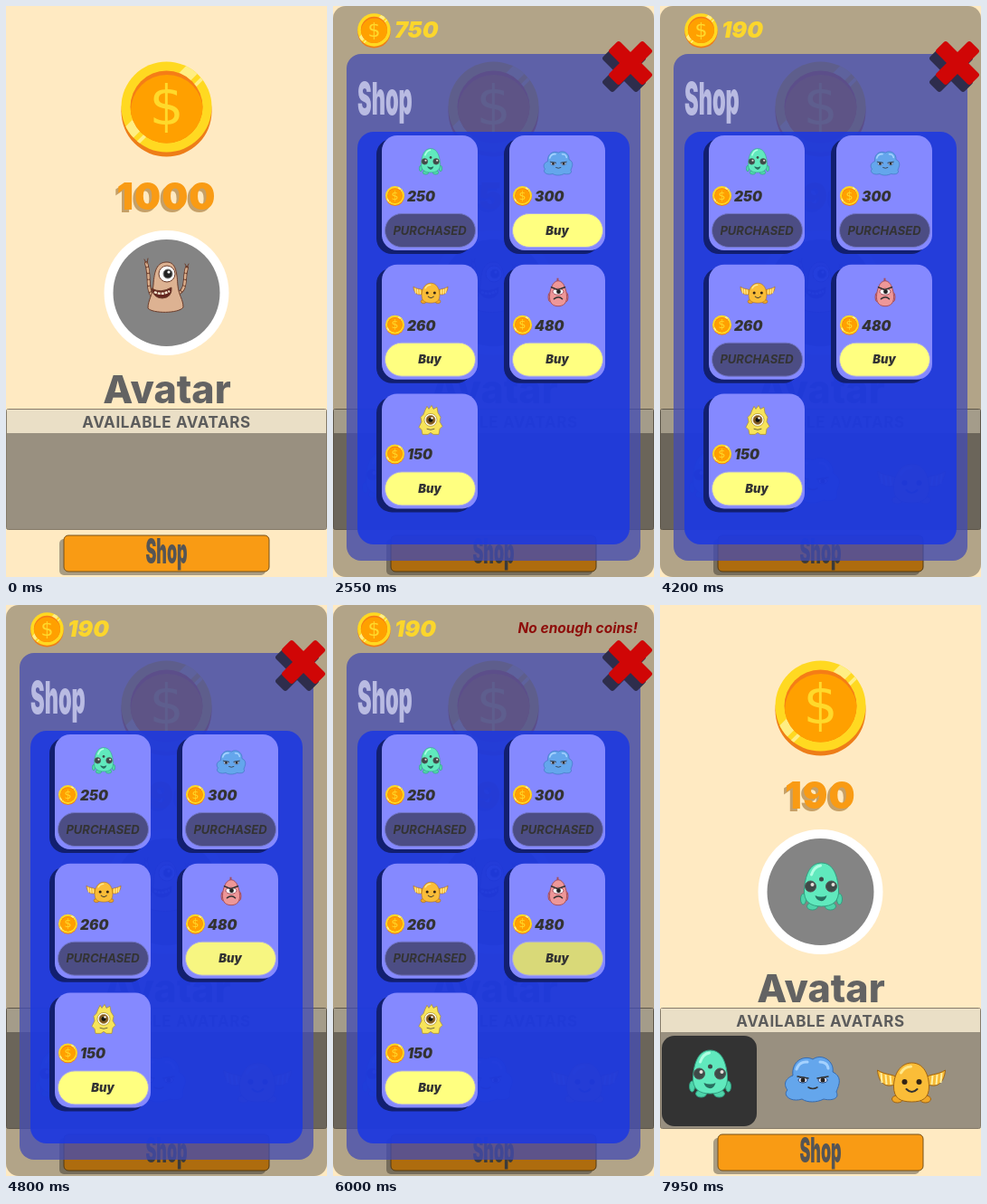
Recreate the animation shown at these times as an HTML page. Size 355 px wide and 631 px high, loop 8000 ms.

```html
<!DOCTYPE html>
<html lang="en">
<head>
<meta charset="utf-8">
<title>Avatar shop</title>
<style>
  html, body { margin: 0; width: 100%; height: 100%; overflow: hidden; background: #ffeac2; }
  svg { display: block; }
  text { font-family: Inter, "Open Sans", sans-serif; font-weight: 900; }
  .mid { text-anchor: middle; }
  .it { font-style: italic; }
  .dollar { font: 400 60px "DejaVu Sans", sans-serif; fill: #ffd92b; }
  .total { font-size: 41px; letter-spacing: 1px; fill: #f99b14; filter: drop-shadow(-3px 3px 0 #c5a068); }
  .ink { fill: none; stroke: #333; stroke-linecap: round; }
</style>
</head>
<body>
<svg id="stage" width="355" height="631" viewBox="0 0 355 631">
  <defs>
    <clipPath id="disc"><circle cx="50.5" cy="50.5" r="50"/></clipPath>
    <clipPath id="hole"><circle cx="50.5" cy="50.5" r="40"/></clipPath>

    <g id="coin">
      <circle cx="50.5" cy="55.5" r="50" fill="#ee7d18"/>
      <circle cx="50.5" cy="50.5" r="50" fill="#ffd921"/>
      <g clip-path="url(#disc)" stroke="#ffee83">
        <path d="M100-12L-12 100" stroke-width="15"/>
        <path d="M116-7L-7 116" stroke-width="4"/>
      </g>
      <circle cx="50.5" cy="50.5" r="40" fill="#f57d16"/>
      <circle cx="51" cy="55" r="40" fill="#ffa000" clip-path="url(#hole)"/>
      <text class="dollar mid" x="50.5" y="70">$</text>
    </g>

    <g id="cyclops" stroke="#6b3d2c">
      <g fill="none" stroke-linecap="round">
        <path d="M9 42C2 32 7 20 2 5M36 39C48 35 43 22 47 10" stroke-width="4"/>
        <path d="M9 42C2 32 7 20 2 5M36 39C48 35 43 22 47 10" stroke="#dcb08d" stroke-width="2.4" stroke-dasharray="4 3"/>
        <path d="M2 5L0 1M3 5L4 0M47 10L45 6M47 10L49 6"/>
      </g>
      <path d="M4 55C4 46 9 41 10 29C11 13 14 4 25 4C36 4 36 19 37 30C38 41 43 45 43 54C38 61 9 61 4 55Z" fill="#ddb292"/>
      <circle cx="25" cy="17" r="9" fill="#fff"/>
      <circle cx="26" cy="17" r="5" fill="#222" stroke="#777"/>
      <circle cx="27" cy="15" r="1.6" fill="#fff" stroke="none"/>
      <path d="M8 33Q18 39 30 32Q31 43 20 44Q10 44 8 33Z" fill="#63261f"/>
      <path d="M11 37Q19 41 28 36" stroke="#f7ead2" stroke-width="2.5" stroke-dasharray="3 1" fill="none"/>
    </g>

    <g id="mint" stroke="#319e80">
      <g fill="#4ed4aa">
        <ellipse cx="14" cy="49" rx="6" ry="4"/><ellipse cx="34" cy="49" rx="6" ry="4"/>
        <ellipse cx="4" cy="41" rx="3" ry="6"/><ellipse cx="44" cy="41" rx="3" ry="6"/>
      </g>
      <path d="M24 1C38 1 42 17 43 30C44 44 36 49 24 49C12 49 4 44 5 30C6 17 10 1 24 1Z" fill="#60e9bd"/>
      <path d="M13 14Q16 5 23 4" fill="none" stroke="#b0ffe3" stroke-width="3" stroke-linecap="round"/>
      <g stroke="#555" fill="#3e4a48">
        <circle cx="12" cy="27" r="6"/><circle cx="35" cy="27" r="6"/><circle cx="24" cy="19" r="2.5" stroke="none"/>
      </g>
      <g fill="#e6ddd8" stroke="none"><circle cx="14" cy="25" r="2"/><circle cx="37" cy="25" r="2"/></g>
      <path d="M17 37Q24 40 30 37Q28 44 23 43Q18 42 17 37Z" fill="#286f60" stroke="none"/>
    </g>

    <g id="cloud" stroke="#346bb2">
      <path d="M10 22C8 6 22-1 32 4C42-3 56 6 54 18C66 24 60 34 58 40C62 48 52 50 44 48C36 52 26 52 20 48C8 52-2 44 4 38C-2 30 4 24 10 22Z" fill="#64a6ec"/>
      <path d="M14 15Q17 6 26 7M40 7Q48 7 49 14" fill="none" stroke="#a5d2ff" stroke-width="3" stroke-linecap="round"/>
      <g fill="#eef" stroke="#234a84"><ellipse cx="21" cy="27" rx="5" ry="3"/><ellipse cx="43" cy="27" rx="5" ry="3"/></g>
      <g fill="#222" stroke="none"><circle cx="21" cy="27" r="2.5"/><circle cx="43" cy="27" r="2.5"/></g>
      <path class="ink" d="M15 23L27 25M37 25L49 23M27 35Q32 38 37 35" stroke-width="1.5"/>
    </g>

    <g id="horns" stroke="#a06412">
      <g id="horn">
        <path d="M20 25C9 29 2 22 1 9C9 14 15 13 21 16Z" fill="#f8bb35"/>
        <path d="M5 12L6 23M10 14L11 25M15 15L16 25" stroke="#fff0a5" stroke-width="2"/>
      </g>
      <use href="#horn" transform="matrix(-1 0 0 1 77 0)"/>
      <g fill="#efa728"><ellipse cx="23" cy="41" rx="6" ry="4"/><ellipse cx="54" cy="41" rx="6" ry="4"/></g>
      <path d="M39 1C52 1 58 14 58 27C58 40 51 44 39 44C26 44 19 40 19 27C19 14 26 1 39 1Z" fill="#fabd38"/>
      <path d="M27 12Q31 5 38 5" fill="none" stroke="#ffe88b" stroke-width="3" stroke-linecap="round"/>
      <g fill="#332414" stroke="none"><circle cx="31" cy="22" r="3"/><circle cx="47" cy="22" r="3"/></g>
      <path class="ink" d="M33 30Q39 36 45 30" stroke-width="2"/>
    </g>

    <g id="pink" stroke="#a44f5d">
      <path d="M11 5V1" stroke-width="2"/>
      <ellipse cx="2.5" cy="22" rx="2" ry="5" fill="#dc7a84"/><ellipse cx="20.5" cy="22" rx="2" ry="5" fill="#dc7a84"/>
      <path d="M11.5 4C18 4 21 15 21 22C21 29 17 32 11.5 32C6 32 2 29 2 22C2 15 5 4 11.5 4Z" fill="#ee9798"/>
      <ellipse cx="11.5" cy="16" rx="6" ry="3.5" fill="#fff"/>
      <circle cx="12" cy="16" r="2.4" fill="#222" stroke="none"/>
      <path class="ink" d="M4 11L11 14L19 11M7 24Q12 20 16 24" stroke-width="1.5"/>
    </g>

    <g id="fuzzy" stroke="#ab9025" stroke-width=".7">
      <path d="M7 5L9 1L11 4L14 0L16 4L20 2L21 8L24 13L23 18L26 23L23 26L22 32H16L13 30L10 32H4L3 27L0 24L3 18L2 13L5 10Z" fill="#f7e45a"/>
      <circle cx="13" cy="16" r="7" fill="#fff"/>
      <circle cx="13" cy="16" r="5" fill="#7d4a26"/>
      <circle cx="13" cy="16" r="3" fill="#111"/>
      <circle cx="14.5" cy="14" r="1.2" fill="#fff" stroke="none"/>
      <path class="ink" d="M9 26Q13 28 17 26"/>
    </g>

    <g id="cross">
      <rect x="-27" y="-8.5" width="54" height="17" rx="3" transform="rotate(45)"/>
      <rect x="-27" y="-8.5" width="54" height="17" rx="3" transform="rotate(-45)"/>
    </g>
  </defs>

  <rect width="355" height="631" fill="#ffeac2"/>
  <use href="#coin" x="127" y="61"/>
  <text class="total mid balance" x="177.5" y="225"></text>
  <circle cx="177.5" cy="317" r="69" fill="#fff"/>
  <circle cx="177.5" cy="317" r="59" fill="#848484"/>
  <use href="#cyclops" x="153" y="279" data-to="7950"/>
  <use href="#mint" x="154.5" y="284" data-from="7950"/>
  <text class="mid" x="178" y="439" font-size="43" style="font-weight:800" fill="#636363">Avatar</text>

  <rect x=".5" y="445.5" width="354" height="133" rx="2" fill="#999080" stroke="#857b69"/>
  <rect x="1" y="446" width="353" height="26" fill="#eadfc6"/>
  <text class="mid" x="177.5" y="466" font-size="17" letter-spacing=".6" style="font-weight:700" fill="#5c5c5c">AVAILABLE AVATARS</text>
  <rect x="2" y="476" width="105" height="100" rx="14" fill="#333" data-from="7950"/>
  <use href="#mint" x="31.5" y="491" data-from="2100"/>
  <use href="#cloud" x="137" y="498" data-from="3300"/>
  <use href="#horns" x="239.5" y="505" data-from="4200"/>

  <rect x="59" y="589" width="228" height="40" rx="5" fill="#a99c82"/>
  <rect x="64" y="585" width="227" height="40" rx="5" fill="#f99b14" stroke="#75501b"/>
  <text class="mid" transform="translate(177.5 616) scale(.47 1)" font-size="38" fill="#555">Shop</text>

  <g data-from="1500" data-to="7050">
    <rect width="355" height="631" rx="14" fill="#000" fill-opacity=".3"/>
    <use href="#coin" transform="translate(27 8) scale(.365)"/>
    <text class="it balance" x="68" y="34.5" font-size="25" fill="#fbd62c"></text>
    <text class="it" x="337" y="31" text-anchor="end" font-size="15.5" style="font-weight:700" fill="#8e0d0a" data-from="5250" data-to="6600">No enough coins!</text>
    <rect x="15" y="53" width="325" height="560" rx="16" fill="#424bb3" fill-opacity=".75"/>
    <text transform="translate(27 120) scale(.47 1)" font-size="50" fill="#b9bbe2">Shop</text>
    <rect x="27" y="139" width="301" height="456" rx="18" fill="#1b38e3" fill-opacity=".85"/>
    <g id="cards"></g>
    <use href="#cross" transform="translate(322 71)" fill="#2e2d4c"/>
    <use href="#cross" transform="translate(329 63)" fill="#d00606"/>
  </g>
</svg>
<script>
  const LOOP = 8000, START = 1000;
  // press: touch begins; sold: purchase completes
  const items = [
    { id: 'mint', w: 48, scale: .55, price: 250, press: 1950, sold: 2100 },
    { id: 'cloud', w: 63, scale: .53, price: 300, press: 3150, sold: 3300 },
    { id: 'horns', w: 77, scale: .51, price: 260, press: 3900, sold: 4200 },
    { id: 'pink', w: 23, scale: 1, price: 480, press: 4800, sold: Infinity },
    { id: 'fuzzy', w: 26, scale: 1, price: 150, press: Infinity, sold: Infinity }
  ];
  const tops = { mint: 14, cloud: 17, horns: 20, pink: 14, fuzzy: 13 };

  const card = (it, i) => `
    <g transform="translate(${54 + i % 2 * 141} ${143 + (i >> 1) * 142.7})">
      <rect x="-6" y="4" width="106" height="127" rx="17" fill="#121f70"/>
      <rect width="106" height="127" rx="17" fill="#8589ff"/>
      <use href="#${it.id}" transform="translate(${54 - it.w * it.scale / 2} ${tops[it.id]}) scale(${it.scale})"/>
      <use href="#coin" transform="translate(4 56) scale(.208)"/>
      <text class="it" x="28" y="73" font-size="15.5" fill="#333">${it.price}</text>
      <g data-to="${it.sold}">
        <rect class="buy" x="3.5" y="86.5" width="100" height="37" rx="18.5" fill="#ffff80" stroke="#a8a9e6"/>
        <text class="it mid" x="53" y="109.5" font-size="13" fill="#333">Buy</text>
      </g>
      <g data-from="${it.sold}">
        <rect x="3.5" y="86.5" width="100" height="37" rx="18.5" fill="#4c4d84" stroke="#7175c5"/>
        <text class="it mid" x="53" y="109.5" font-size="13" style="font-weight:700" fill="#333">PURCHASED</text>
      </g>
    </g>`;
  document.getElementById('cards').innerHTML = items.map(card).join('');

  const timed = [...document.querySelectorAll('[data-from], [data-to]')];
  const balances = document.querySelectorAll('.balance');
  const buttons = document.querySelectorAll('.buy');

  function buttonColor(it, t) {
    if (t < it.press) return '#ffff80';
    if (it.id !== 'pink') return '#d9d978';
    return t >= 5250 && t < 6300 ? '#d9d978' : '#f7f681';
  }

  function draw(t) {
    for (const el of timed) {
      const { from = 0, to = Infinity } = el.dataset;
      el.style.display = t >= +from && t < +to ? '' : 'none';
    }
    const left = items.reduce((sum, it) => t >= it.sold ? sum - it.price : sum, START);
    balances.forEach(el => { el.textContent = left; });
    items.forEach((it, i) => buttons[i].setAttribute('fill', buttonColor(it, t)));
  }

  const origin = performance.now();
  function tick() {
    draw((performance.now() - origin) % LOOP);
    requestAnimationFrame(tick);
  }
  tick();
</script>
</body>
</html>
```
